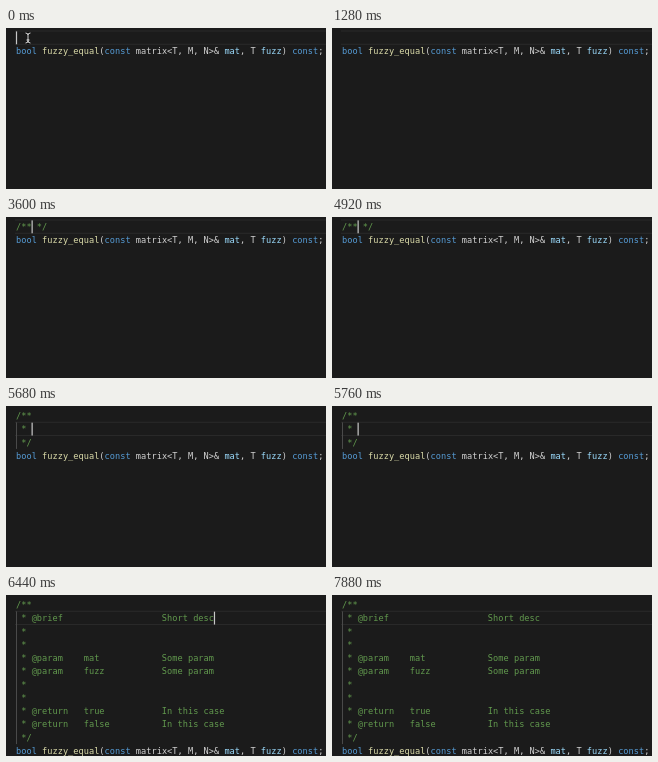
Recreate the animation shown at these times as an HTML page with a canvas. Size 320x161 px, loop 8 s.

```html
<!DOCTYPE html>
<html lang="en">
<head>
<meta charset="utf-8">
<title>Doc comment snippet</title>
<style>
  html, body { margin: 0; width: 100%; height: 100%; overflow: hidden; background: #1b1b1b; }
  canvas { display: block; width: 320px; height: 161px; }
</style>
</head>
<body>
<canvas id="stage" width="320" height="161"></canvas>
<script>
const ctx = document.getElementById('stage').getContext('2d');
const LOOP = 8000;
const LEFT = 10, TOP = 3.1, ADVANCE = 5.21, ROW = 13.27, BASELINE = 9.9;
const FONT_SIZE = ADVANCE / 0.602;
const COLOR = {
  back: '#1b1b1b', line: '#2a2a2a', guide: '#4a4a4a', caret: '#c8c8c8',
  plain: '#d4d4d4', keyword: '#569cd6', name: '#dcdcaa', param: '#9cdcfe', comment: '#629a4e'
};

const declaration = [
  ['bool ', 'keyword'], ['fuzzy_equal', 'name'], ['(', 'plain'], ['const', 'keyword'],
  [' matrix<T, M, N>& ', 'plain'], ['mat', 'param'], [', T ', 'plain'], ['fuzz', 'param'],
  [') ', 'plain'], ['const', 'keyword'], [';', 'plain']
];

const tagLine = (tag, name, text) => ' * ' + ('@' + tag).padEnd(10) + name.padEnd(15) + text;

const template = [
  '/**',
  tagLine('brief', '', 'Short desc'),
  ' *', ' *',
  tagLine('param', 'mat', 'Some param'),
  tagLine('param', 'fuzz', 'Some param'),
  ' *', ' *',
  tagLine('return', 'true', 'In this case'),
  tagLine('return', 'false', 'In this case'),
  ' */'
];

// Each state holds from its start time: comment lines and caret [row, column].
const states = [
  { at: 0, lines: [''], caret: [0, 0] },
  { at: 2880, lines: ['/'], caret: [0, 1], color: 'plain' },
  { at: 3120, lines: ['/* */'], caret: [0, 2] },
  { at: 3360, lines: ['/** */'], caret: [0, 3] },
  { at: 5120, lines: ['/**', ' * ', ' */'], caret: [1, 3] },
  { at: 5800, lines: template, caret: [1, 38] }
];

const caretHidden = t => (t >= 560 && t < 2880) || t >= 7040;
const pointerShown = t => t < 1280;
const rowTop = row => TOP + row * ROW;

function rect(color, x, y, w, h) {
  ctx.fillStyle = COLOR[color];
  ctx.fillRect(x, y, w, h);
}

// Text is set large and scaled down to keep fractional advances exact.
function drawText(text, row, col, color) {
  ctx.save();
  ctx.translate(LEFT + col * ADVANCE, rowTop(row) + BASELINE);
  ctx.scale(0.1, 0.1);
  ctx.font = `${FONT_SIZE * 10}px "DejaVu Sans Mono", monospace`;
  ctx.fillStyle = COLOR[color];
  ctx.fillText(text, 0, 0);
  ctx.restore();
}

function drawDeclaration(row) {
  let col = 0;
  for (const [text, color] of declaration) {
    drawText(text, row, col, color);
    col += text.length;
  }
}

function drawPointer(x, y) {
  const beam = new Path2D(
    `M${x - 2.5} ${y - 5}Q${x} ${y - 5} ${x} ${y - 3}V${y + 3}Q${x} ${y + 5} ${x - 2.5} ${y + 5}` +
    `M${x + 2.5} ${y - 5}Q${x} ${y - 5} ${x} ${y - 3}M${x} ${y + 3}Q${x} ${y + 5} ${x + 2.5} ${y + 5}` +
    `M${x - 1.5} ${y + 2}H${x + 1.5}`
  );
  for (const [color, width] of [['#000', 2.2], ['#eee', 1]]) {
    ctx.strokeStyle = color;
    ctx.lineWidth = width;
    ctx.stroke(beam);
  }
}

function draw(t) {
  const { lines, caret: [row, col], color = 'comment' } = states.findLast(s => s.at <= t);
  rect('back', 0, 0, 320, 161);

  rect('line', 9, rowTop(row) - 0.6, 311, 1);
  rect('line', 9, rowTop(row + 1) - 0.6, 311, 1);
  if (lines.length > 1) rect('guide', LEFT, rowTop(1), 1, (lines.length - 1) * ROW);

  lines.forEach((line, i) => drawText(line, i, 0, color));
  drawDeclaration(lines.length);

  if (!caretHidden(t)) rect('caret', LEFT + col * ADVANCE - 0.1, rowTop(row) + 0.3, 1.2, ROW - 0.4);
  if (pointerShown(t)) drawPointer(22, 10);
}

const start = performance.now();
function tick() {
  draw((performance.now() - start) % LOOP);
  requestAnimationFrame(tick);
}
tick();
</script>
</body>
</html>
```
